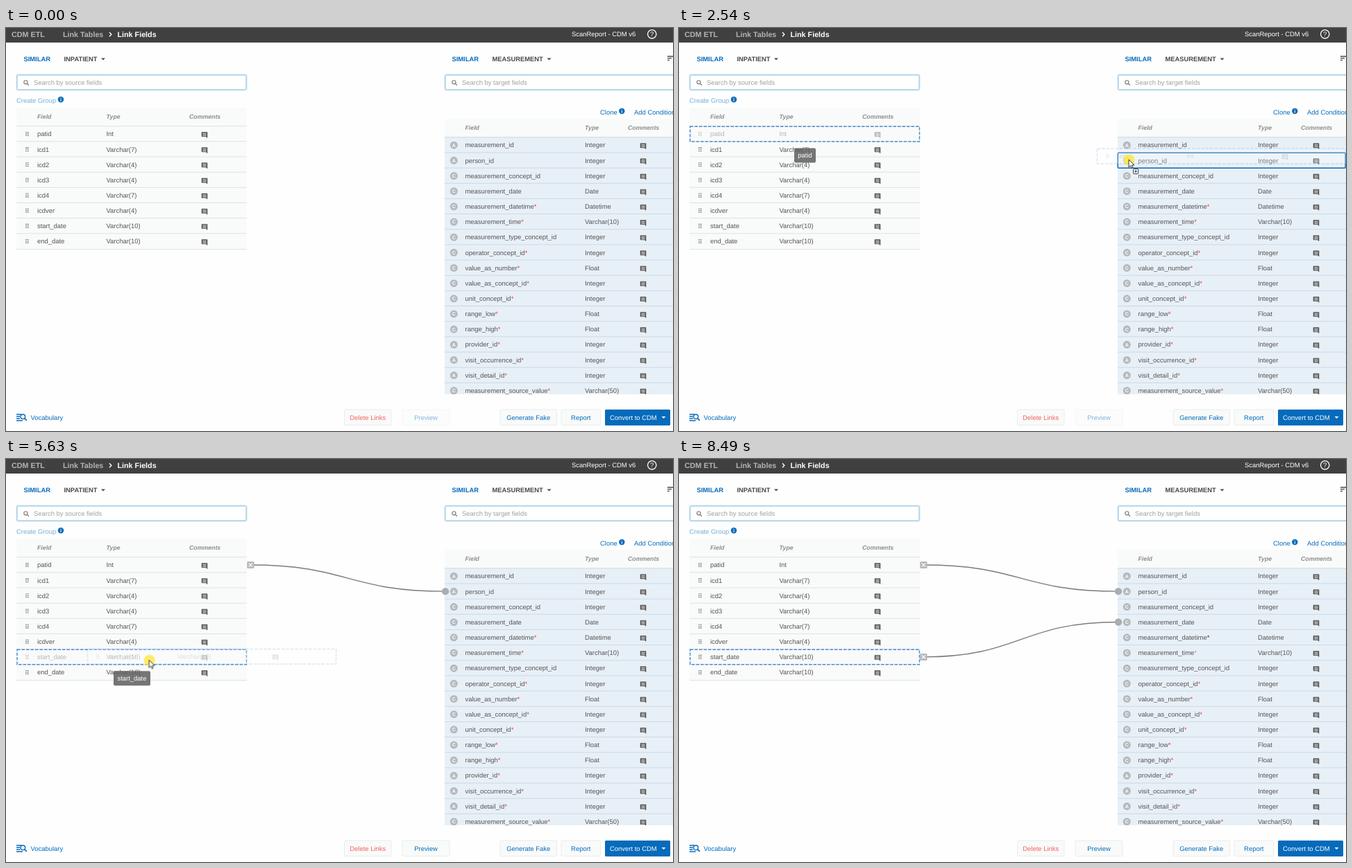
These frames come from a looping animation (961x582 px, 8.99 s). An HTML page:

```html
<!DOCTYPE html>
<html lang="en">
<head>
<meta charset="utf-8">
<title>Link Fields</title>
<style>
html, body { margin: 0; height: 100%; overflow: hidden; background: #fefefe; }
svg { display: block; width: 961px; height: 582px; }
text { font: 9.45px "Liberation Sans", Arial, sans-serif; fill: #555; text-rendering: geometricPrecision; }
.bar { font-size: 10.75px; font-weight: bold; fill: #b4b4b4; }
.white { fill: #fff; }
.tab { font-size: 9.35px; font-weight: bold; fill: #484848; }
.blue { fill: #066bbb; }
.pale { fill: #74afdb; }
.hint { fill: #a0a0a0; }
.head { font-size: 8.75px; font-weight: bold; font-style: italic; fill: #8d8d8d; }
.red { fill: #f4635b; }
.letter { font-size: 7px; font-weight: bold; fill: #fff; text-anchor: middle; }
.mid { text-anchor: middle; }
.star { fill: #f03c3c; }
.dash { fill: none; stroke: #4a90cf; stroke-width: 1.5; stroke-dasharray: 4.5 2; }
.link { fill: none; stroke: #7b7b7b; stroke-width: 1.4; }

/* Hard switches: values hold until the next stop */
.step { animation: 8990ms step-end infinite; }
.off { opacity: 0; }
#preview { opacity: .5; animation-name: lateOn; }
#link0 { animation-name: lateOn; }
#link1 { animation-name: link1; }
#pick0 { animation-name: pick0; }
#pick6 { animation-name: pick6; }
#row0 { animation-name: dim0; }
#row6 { animation-name: dim6; }
#hover1 { animation-name: hover1; }
#hover3 { animation-name: hover3; }
#hover4 { animation-name: hover4; }
#hover5 { animation-name: hover5; }
#arrow { animation-name: arrow; }
#cross { animation-name: cross; }
#badge { animation-name: badge; }
#halo { animation-name: halo; }
#star4 { animation-name: star4; }
#star5 { animation-name: star5; }
@keyframes lateOn { 31.81% { opacity: 1 } }
@keyframes link1 { 79.64% { opacity: 1 } }
@keyframes pick0 { 18.9% { opacity: 1 } 54.5% { opacity: 0 } }
@keyframes pick6 { 54.5% { opacity: 1 } }
@keyframes dim0 { 18.9% { opacity: .42 } 31.81% { opacity: 1 } }
@keyframes dim6 { 54.5% { opacity: .42 } 79.64% { opacity: 1 } }
@keyframes hover1 { 27.2% { opacity: 1 } 31.81% { opacity: 0 } }
@keyframes hover5 { 66.3% { opacity: 1 } 69.8% { opacity: 0 } }
@keyframes hover4 { 69.8% { opacity: 1 } 71.9% { opacity: 0 } }
@keyframes hover3 { 71.9% { opacity: 1 } 79.64% { opacity: 0 } }
@keyframes arrow {
  4.78% { opacity: 1 } 11.2% { opacity: 0 } 18.9% { opacity: 1 }
  45.2% { opacity: 0 } 54.5% { opacity: 1 } 94.43% { opacity: 0 }
}
@keyframes cross {
  11.2% { opacity: 1 } 18.9% { opacity: 0 } 45.2% { opacity: 1 } 54.5% { opacity: 0 }
}
@keyframes badge {
  27.2% { opacity: 1 } 30.2% { opacity: 0 } 66.3% { opacity: 1 } 77.5% { opacity: 0 }
}
@keyframes halo {
  18.9% { opacity: 1 } 30.2% { opacity: 0 } 51.6% { opacity: 1 } 77.5% { opacity: 0 }
}
@keyframes star4 { 85.65% { fill: #333 } }
@keyframes star5 { 85.65% { fill: #b29a9f } }

/* Smooth motion */
.move { animation: 8990ms ease-in-out infinite; }
#pointer { animation-name: pointer; }
#ghost0 { animation-name: ghost0; }
#ghost6 { animation-name: ghost6; }
#tip0 { animation-name: tip0; }
#tip6 { animation-name: tip6; }
@keyframes pointer {
  0%, 4.78% { transform: translate(715px, 540px) }
  6.67%, 8.68% { transform: translate(371px, 404px) }
  14.9%, 18.9% { transform: translate(59px, 157px) }
  28.25%, 33.2% { transform: translate(648px, 190px) }
  38.6%, 41.38% { transform: translate(579px, 218px) }
  48.9%, 60.5% { transform: translate(119px, 291px) }
  68.85% { transform: translate(762px, 286px) }
  70.08%, 70.7% { transform: translate(756px, 262px) }
  73.5%, 84.3% { transform: translate(736px, 235px) }
  85.65%, 87.76% { transform: translate(785px, 285px) }
  94.43%, 100% { transform: translate(926px, 582px) }
}
@keyframes ghost0 {
  0%, 18.9% { transform: none; opacity: 0 }
  18.91% { transform: none; opacity: 1 }
  28.25%, 28.9% { transform: translate(587px, 32px); opacity: 1 }
  30.2%, 100% { transform: translate(587px, 32px); opacity: 0 }
}
@keyframes ghost6 {
  0%, 54.5% { transform: none; opacity: 0 }
  57.8%, 60.5% { transform: translate(15px, 0); opacity: 1 }
  68.85% { transform: translate(658px, -5px); opacity: 1 }
  70.08%, 70.7% { transform: translate(652px, -29px); opacity: 1 }
  73.5%, 76.9% { transform: translate(630px, -55px); opacity: 1 }
  77.5%, 100% { transform: translate(630px, -55px); opacity: 0 }
}
@keyframes tip0 {
  0%, 16% { opacity: 0 } 17.57%, 31.81% { opacity: 1 } 31.82%, 100% { opacity: 0 }
}
@keyframes tip6 {
  0%, 49.4% { opacity: 0 } 50.9%, 79.64% { opacity: 1 } 79.65%, 100% { opacity: 0 }
}
</style>
</head>
<body>
<svg id="stage" xmlns="http://www.w3.org/2000/svg"></svg>
<script>
const sourceFields = [
  ['patid', 'Int'], ['icd1', 'Varchar(7)'], ['icd2', 'Varchar(4)'], ['icd3', 'Varchar(4)'],
  ['icd4', 'Varchar(7)'], ['icdver', 'Varchar(4)'], ['start_date', 'Varchar(10)'], ['end_date', 'Varchar(10)']
];
const targetFields = `A measurement_id Integer
A person_id Integer
C measurement_concept_id Integer
C measurement_date Date
C measurement_datetime* Datetime
C measurement_time* Varchar(10)
C measurement_type_concept_id Integer
C operator_concept_id* Integer
C value_as_number* Float
C value_as_concept_id* Integer
C unit_concept_id* Integer
C range_low* Float
C range_high* Float
A provider_id* Integer
A visit_occurrence_id* Integer
A visit_detail_id* Integer
C measurement_source_value* Varchar(50)`.split('\n').map(line => line.split(' '));

const sourceY = i => 153 + 22.15 * i;
const targetY = i => 169 + 22.16 * i;

// Text and shapes are placed by their vertical centre
const text = (x, y, content, cls = '') => `<text x="${x}" y="${y + 3.4}" class="${cls}">${content}</text>`;
const rect = (x, y, w, h, attrs) => `<rect x="${x}" y="${y}" width="${w}" height="${h}" ${attrs}/>`;
const path = (d, attrs) => `<path d="${d}" ${attrs}/>`;
const rule = (x, y, w, color) => path(`M${x} ${y}h${w}`, `stroke="${color}"`);
const caret = (x, y, color) => path(`M${x - 3} ${y - 1.5}h6l-3 3z`, `fill="${color}"`);

const comment = (x, y) =>
  path(`M${x - 4} ${y - 3.3}h8v8l-2-1.8h-6z`, 'fill="#555" stroke="#555" stroke-width=".6" stroke-linejoin="round"') +
  path(`M${x - 2.6} ${y - 1.6}h5.2m-5.2 1.6h5.2m-5.2 1.6h5.2`, 'stroke="#fff" stroke-width=".7"');

const handle = (x, y) => path([-2.4, 0, 2.4].map(d => `M${x - 1.9} ${y + d}h1.3m1.3 0h1.3`).join(''),
  'stroke="#555" stroke-width="1.3"');

const magnifier = (x, y, r, color, width) =>
  `<circle cx="${x}" cy="${y}" r="${r}" fill="none" stroke="${color}" stroke-width="${width}"/>` +
  path(`M${x + r * .7} ${y + r * .7}l${r} ${r}`, `stroke="${color}" stroke-width="${width * 1.2}"`);

const info = (x, y) => `<circle cx="${x}" cy="${y}" r="4.2" class="blue"/>` +
  path(`M${x} ${y - 2.5}v1.1m0 .8v3.1`, 'stroke="#fff" stroke-width="1.1"');

const searchBox = (x, placeholder) =>
  rect(x - .5, 67.5, 331, 22, 'rx="2" fill="none" stroke="#dcecf6" stroke-width="2.6"') +
  rect(x, 68, 330, 21, 'rx="1.5" fill="#fff" stroke="#8ebfdc"') +
  magnifier(x + 12.4, 78.3, 2.6, '#777', 1.1) + text(x + 24, 78.5, placeholder, 'hint');

const tabs = (x, name, caretX) => text(x, 45, 'SIMILAR', 'tab blue') +
  text(x + 58, 45, name, 'tab') + caret(caretX, 45, '#484848');

const tableHead = (y, columns) => columns.map(([x, name]) => text(x, y, name, 'head')).join('');

const sourceCells = ([name, type], y) =>
  handle(30.3, y) + text(45, y, name) + text(144.5, y, type) + comment(286, y + .8);

const sourceTable = () => rect(15, 115, 332, 205, 'fill="#f9fafa"') +
  tableHead(127.8, [[45, 'Field'], [144.5, 'Type'], [264, 'Comments']]) +
  sourceFields.map((field, i) => rule(15, sourceY(i) - 11.3, 332, '#dfe2e2') +
    `<g id="row${i}" class="step">${sourceCells(field, sourceY(i))}</g>`).join('') +
  rule(15, 319.7, 332, '#dfe2e2');

const targetRow = ([kind, name, type], i) => {
  const y = targetY(i);
  const label = name.replace('*', `<tspan id="star${i}" class="star step">*</tspan>`);
  return rule(632, y - 11.2, 330, '#ccd8e2') +
    `<circle cx="645.3" cy="${y + .2}" r="5.5" fill="#b7b9bb"/>` + text(645.3, y - .8, kind, 'letter') +
    text(661.5, y, label) + text(834, y, type) + comment(918, y + 1);
};

const targetTable = () => rect(632, 131, 330, 27, 'fill="#f9fafa"') + rect(632, 158, 330, 371, 'fill="#e8f0f7"') +
  tableHead(143.8, [[661.5, 'Field'], [834, 'Type'], [896, 'Comments']]) +
  `<clipPath id="list"><rect x="632" y="157" width="330" height="372"/></clipPath>
   <g clip-path="url(#list)">${targetFields.map(targetRow).join('')}</g>`;

const button = (x, w, label, cls) =>
  rect(x + .5, 551, w - 1, 22.5, 'rx="1.5" fill="#f9fafa" stroke="#ececec"') + text(x + w / 2, 562.3, label, cls + ' mid');

const pick = i => rect(16, sourceY(i) - 10.7, 330.5, 21.6, `id="pick${i}" class="dash step off"`);

const hover = i => rect(632.2, targetY(i) - 11, 328, 22,
  `id="hover${i}" class="step off" rx="1.5" fill="none" stroke="#0d6ab4" stroke-width="1.5"`);

const link = (id, from, to) => {
  const a = sourceY(from), b = targetY(to);
  return `<g id="link${id}" class="step off">` +
    path(`M352 ${a}C492.5 ${a} 492.5 ${b} 633 ${b}`, 'class="link"') +
    `<circle cx="633" cy="${b}" r="5.2" fill="#adadad"/>` +
    rect(347.2, a - 5, 10.4, 10, 'rx="1.5" fill="#b9b9b9"') +
    path(`M349.8 ${a - 2.6}l5.2 5.2m0-5.2l-5.2 5.2`, 'stroke="#fff" stroke-width="1.2"') + '</g>';
};

const ghost = i => `<g id="ghost${i}" class="move off">` +
  rect(15, sourceY(i) - 11, 359, 22, 'fill="#fff" opacity=".25"') +
  `<g opacity=".17">${sourceCells(sourceFields[i], sourceY(i))}</g>` +
  rect(15.5, sourceY(i) - 10.7, 358, 21.6, 'class="dash" opacity=".22"') + '</g>';

const tooltip = (i, y, w) => `<g id="tip${i}" class="move off">` +
  rect(181.5 - w / 2, y - 10.5, w, 21, 'rx="2" fill="#616161" opacity=".87"') +
  text(181.5, y, sourceFields[i][0], 'white mid') + '</g>';

const pointer = () => `<g id="pointer" class="move">
  <circle id="halo" class="step off" cx=".5" cy=".5" r="8" fill="#ffe84a" fill-opacity=".85"/>
  <g id="cross" class="step off" fill="#fff" stroke="#222" stroke-width=".8">
    ${[0, 90, 180, 270].map(a => path('M-1-1.5V-4H-2.8L0-7.2 2.8-4H1V-1.5z', `transform="rotate(${a})"`)).join('')}
    <rect x="-1.3" y="-1.3" width="2.6" height="2.6"/>
  </g>
  <g id="arrow" class="step off" fill="#fff" stroke="#222" stroke-width=".9">
    <path d="M0 0V11L2.6 8.7 4.3 12.5 6 11.7 4.4 8H8Z"/>
    <g id="badge" class="step off"><rect x="6.6" y="13.6" width="7" height="7" rx=".8"/><path d="M8.2 17.1h3.8m-1.9-1.9v3.8"/></g>
  </g>
</g>`;

document.getElementById('stage').innerHTML = [
  rect(0, 0, 961, 21, 'fill="#404040"'),
  text(8, 9.2, 'CDM ETL', 'bar'), text(82, 9.2, 'Link Tables', 'bar'), text(160.5, 9.2, 'Link Fields', 'bar white'),
  path('M149 6.3l2.8 3-2.8 3', 'fill="none" stroke="#fff" stroke-width="1.4"'),
  text(815, 8.3, 'ScanReport - CDM v6', 'white'),
  '<circle cx="930.7" cy="8.8" r="6.2" fill="none" stroke="#fff" stroke-width="1.3"/>',
  text(930.7, 8.8, '?', 'white mid'),

  tabs(25.5, 'INPATIENT', 140), tabs(642.5, 'MEASUREMENT', 782.5),
  path('M953 41h9m-9 2.7h6m-6 2.7h3', 'stroke="#444" stroke-width="1.3"'),
  searchBox(16, 'Search by source fields'), searchBox(633, 'Search by target fields'),
  text(15, 104.7, 'Create Group', 'pale'), info(79, 103.3),
  text(856, 121.7, 'Clone', 'blue'), info(887.3, 120), text(905, 121.7, 'Add Condition', 'blue'),

  sourceTable(), targetTable(),

  path('M15 558h7m-7 3h5m-5 3h5m-5 3h9', 'stroke="#066bbb" stroke-width="1.3"'),
  magnifier(24.3, 561.3, 3.3, '#066bbb', 1.4), text(35.5, 562.3, 'Vocabulary', 'blue'),
  button(487, 68.5, 'Delete Links', 'red'),
  `<g id="preview" class="step">${button(570.5, 69, 'Preview', 'blue')}</g>`,
  button(711.5, 82.5, 'Generate Fake', 'blue'), button(799.5, 57.5, 'Report', 'blue'),
  rect(863, 551, 94, 23, 'rx="1.5" class="blue"'), text(870, 562.3, 'Convert to CDM', 'white'), caret(947.5, 562.5, '#fff'),

  pick(0), pick(6), [1, 3, 4, 5].map(hover).join(''),
  link(0, 0, 1), link(1, 6, 3), ghost(0), ghost(6),
  tooltip(0, 184, 31), tooltip(6, 316.8, 53), pointer()
].join('');
</script>
</body>
</html>
```
